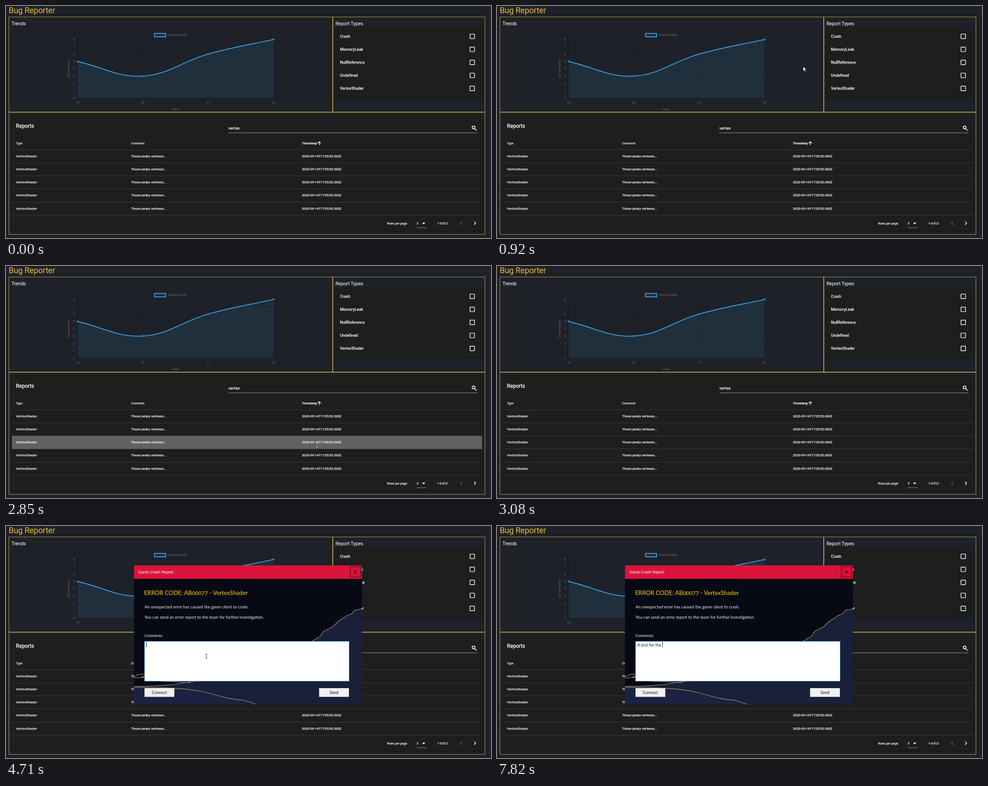
An HTML page that plays this animation: 1082x518 px, repeating every 8000 ms.

```html
<!DOCTYPE html>
<html lang="en">
<head>
<meta charset="utf-8">
<title>Bug Reporter</title>
<style>
html, body { margin: 0; width: 100%; height: 100%; overflow: hidden; background: #1e2128; }
svg { display: block; }
text { white-space: pre; }
.ui { font-family: Roboto, sans-serif; fill: #fff; }
.chart { font-family: "Liberation Sans", Arial, sans-serif; }
.form { font-family: Lato, sans-serif; font-variant-numeric: oldstyle-nums; }
</style>
</head>
<body>
<svg id="stage" width="1082" height="518" viewBox="0 0 1082 518"></svg>
<script>
const stage = document.getElementById('stage');
const BLUE = '#36a2eb', GOLD = '#e3b93f';

// Text is placed by the vertical middle of its capitals.
const text = (x, mid, str, size, cls, extra = '') =>
  `<text x="${x}" y="${mid + size * 0.36}" font-size="${size}" class="${cls}" ${extra}>${str}</text>`;
const ui = (x, mid, str, size, gap = 0, extra = '') =>
  text(x, mid, str, size, 'ui', `letter-spacing="${gap}" ${extra}`);
const rect = (x, y, w, h, fill, extra = '') =>
  `<rect x="${x}" y="${y}" width="${w}" height="${h}" fill="${fill}" ${extra}/>`;
const path = (d, stroke, width = 1, fill = 'none', extra = '') =>
  `<path d="${d}" stroke="${stroke}" stroke-width="${width}" fill="${fill}" ${extra}/>`;
const list = (n, fn) => Array.from({ length: n }, (_, i) => fn(i)).join('');
const MEDIUM = 'font-weight="500"';

const ROW_TOP = 321, ROW_H = 29.15;
const rowY = i => Math.round(ROW_TOP + i * ROW_H);

function panels() {
  const frame = (x, y, w, h) => rect(x, y, w, h, 'none', 'stroke="#f0c242" stroke-width=".75"');
  const shade = 'style="filter:drop-shadow(0 1px 1px #0006)"';
  return ui(6, 9, 'Bug Reporter', 18.5, -0.35, `style="fill:${GOLD}"`) +
    frame(6.5, 24.6, 722.1, 212.1) + frame(729.4, 24.6, 339.1, 212.1) + frame(6.5, 237.4, 1062, 272.6) +
    ui(12, 38.5, 'Trends', 11.2, -0.35) + ui(735, 38.5, 'Report Types', 11.2, -0.3) +
    rect(735, 48, 327, 156, '#1e1e1e', shade) + rect(13, 244, 1049, 258, '#1e1e1e', shade);
}

function chart() {
  const x = [160, 305.5, 451, 597], tick = n => 205.3 - n * 16.35;
  const label = (px, py, str, extra = '') =>
    text(px, py, str, 7.2, 'chart', `fill="#666" ${extra}`);
  const curve = 'M160 124C218.2 136.9 248.2 159.7 305.5 156.4S392 124 451 107.4 538.6 87.7 597 74.6';
  return list(9, i => path(`M154 ${tick(i)}H597`, '#000', 0.6, 'none', 'opacity=".12"') +
      label(154, tick(i), i, 'text-anchor="end"')) +
    x.map((px, i) => path(`M${px} 74V210`, '#000', 0.6, 'none', `opacity="${i ? 0.12 : 0.3}"`) +
      label(px, 215.5, [13, 15, 17, 20][i], 'text-anchor="middle"')).join('') +
    path(curve + 'V205H160Z', 'none', 0, BLUE, 'fill-opacity=".1"') +
    path(curve, BLUE, 1.9) +
    x.map((px, i) => `<circle cx="${px}" cy="${tick([5, 3, 6, 8][i])}" r="1.9" fill="#255b80" stroke="${BLUE}" stroke-width=".8"/>`).join('') +
    rect(331.3, 61.2, 24.8, 7.8, '#21303e', `stroke="${BLUE}" stroke-width="1.8"`) +
    label(360, 64.5, 'VertexShader') +
    label(378, 230, 'Hour', 'text-anchor="middle"') +
    label(0, 0, 'Occurrences', 'text-anchor="middle" transform="translate(139 140) rotate(-90)"');
}

function types() {
  return ['Crash', 'MemoryLeak', 'NullReference', 'Undefined', 'VertexShader'].map((name, i) => {
    const y = 67.7 + i * 29.1;
    return ui(745, y, name, 9.2, -0.22, MEDIUM) +
      rect(1035.1, y - 5.1, 10.2, 10.2, 'none', 'rx=".8" stroke="#fff" stroke-width="1.4"');
  }).join('');
}

function table() {
  const head = (x, str, gap, fill = '#ddd') =>
    ui(x, 306, str, 7, gap, `font-weight="700" style="fill:${fill}"`);
  return ui(22, 268, 'Reports', 12, -0.25, MEDIUM) +
    ui(496, 272.5, 'vertex', 9.5, -0.15, MEDIUM) +
    path('M496 283.2H1052', '#bbb', 0.8) +
    path('M1046.4 271.3a3.2 3.2 0 1 1-6.4 0a3.2 3.2 0 1 1 6.4 0M1045.5 273.8L1050 278.2', '#fff', 1.6) +
    head(22, 'Type', -0.1) + head(279, 'Comment', -0.15) + head(660, 'Timestamp', -0.25, '#fff') +
    path('M699 310.5V303M695.3 306.5L699 302.8L702.7 306.5', '#fff', 1.3) +
    list(6, i => path(`M13 ${rowY(i) + 0.2}H1062`, '#3a3a3a')) +
    rect(13, 0, 1049, 29.4, '#616161', 'id="hover"') +
    list(5, i => {
      const y = rowY(i) + 14.3;
      return ui(22, y, 'VertexShader', 8, -0.12, MEDIUM) +
        ui(279, y, 'Those pesky vertexes...', 8, -0.26, MEDIUM) +
        ui(660, y, '2020-09-14T17:05:52.000Z', 8, -0.45, MEDIUM);
    }) +
    ui(850, 485, 'Rows per page:', 7, -0.15, MEDIUM) + ui(916, 485, '5', 7.2, 0, MEDIUM) +
    ui(962, 485, '1-5 of 21', 7, -0.42, MEDIUM) +
    path('M916 495H938.5', '#aaa', 0.8) +
    path('M928 483.8H935.6L931.8 487.6Z', 'none', 0, '#fff') +
    path('M1017.7 481.5L1014.2 485L1017.7 488.5', '#6c6c6c', 1.3) +
    path('M1044.3 481.5L1047.8 485L1044.3 488.5', '#fff', 1.5);
}

function dialog() {
  const form = (x, y, str, size, fill, extra = '') =>
    text(x, y, str, size, 'form', `fill="${fill}" ${extra}`);
  const button = (x, str) => rect(x, 362, 66.5, 19.5, '#f0f0f0') +
    form(x + 33.2, 371.7, str, 9.1, '#111', 'text-anchor="middle"');
  const ridge = 'M794 184Q785 188 780 187C775 190 774 193 770 197Q760 199 755 204L741 213 730 224Q720 230 709 235C704 240 705 246 696 249L682 258';
  const hill = 'M285 358Q340 359 385 352T433 347';
  const shore = 'M285 360C350 361 395 362 430 368S490 387 530 389Q546 393 560 399';
  const foot = 'M285 337C293 335 296 329 309 331M285 338.5Q297 341 309 335M302 339L309 337M345 347Q375 347 412 350';
  const tan = '#a8996b';
  return rect(285.5, 88, 508.5, 310.5, '#070915') +
    '<clipPath id="inside"><rect x="285.5" y="118" width="508.5" height="280.5"/></clipPath><g clip-path="url(#inside)">' +
    path(ridge + 'L433 347Q412 349 385 352T285 358V399H794Z', 'none', 0, '#192039') +
    path(shore + 'H285Z', 'none', 0, '#1c2340') +
    [ridge, hill, shore, foot].map(d => path(d, tan, 1.1)).join('') + '</g>' +
    rect(285.5, 88, 508.5, 30, '#dc143c') +
    text(295, 102.7, 'Game Crash Report', 8.7, 'chart', 'fill="#fff"') +
    rect(768, 90.5, 23.5, 23.5, '#d21239', 'stroke="#3c0612"') +
    text(779.7, 102.3, 'X', 9.5, 'chart', 'fill="#160307" font-weight="700" text-anchor="middle"') +
    form(308, 149.5, 'ERROR CODE: AB00077 - VertexShader', 13.2, '#ffd000') +
    form(309, 180.5, 'An unexpected error has caused the game client to crash.', 9.27, '#f2f2f2') +
    form(309, 203.5, 'You can send an error report to the team for further investigation.', 9.27, '#f2f2f2') +
    text(308.5, 245.5, 'Comments:', 8.2, 'chart', 'fill="#f2f2f2"') +
    rect(309, 257.5, 456.5, 89, '#fff', 'id="field"') +
    form(313, 265.3, '', 9.27, '#222', 'id="typed"') +
    rect(313, 259, 1, 12, '#111', 'id="caret"') +
    button(309, 'Connect') + button(698.5, 'Send');
}

const tooltip = `<g id="tip">
  <circle cx="597" cy="74.5" r="2.6" fill="#255b80" stroke="${BLUE}"/>
  ${rect(534, 79, 68, 25, '#000', 'rx="3.5" opacity=".85"')}
  ${path('M593.5 79L597 76L600.5 79Z', 'none', 0, '#000', 'opacity=".85"')}
  ${text(537.5, 85.5, '20', 7.2, 'chart', 'fill="#fff" font-weight="700"')}
  ${rect(537.5, 93.5, 7, 7, '#e3f1fb', 'stroke="#fff"')}
  ${text(546, 96.7, 'VertexShader: 8', 7, 'chart', 'fill="#fff" font-weight="700"')}</g>`;

stage.innerHTML = panels() + chart() + types() + table() + tooltip +
  `<g id="dialog">${dialog()}</g>` +
  path('M0 0V10.2L2.4 8L4 11.8L5.7 11L4.1 7.4H7.2Z', '#111', 0.7, '#fff', 'id="arrow"') +
  path('M-2.3 -4.6H-.6L0 -4L.6 -4.6H2.3M0 -4V4M-2.3 4.6H-.6L0 4L.6 4.6H2.3', '#333', 1, 'none', 'id="beam"');

const el = {};
for (const id of ['hover', 'tip', 'dialog', 'field', 'typed', 'caret', 'arrow', 'beam'])
  el[id] = document.getElementById(id);
const show = (node, on) => node.setAttribute('display', on ? 'inline' : 'none');

// Pointer trips: [time, x, y] stops, then the time at which the pointer vanishes.
const trips = [
  { stops: [[300, 1064, 501], [450, 928, 357], [600, 830, 255], [825, 705, 150], [1080, 630, 99]], end: 1140 },
  { stops: [[1140, 618, 89], [1290, 600, 77], [1680, 597, 75]], end: 2620 },
  { stops: [[2620, 602, 88], [2695, 616, 150], [2770, 650, 262], [2845, 694, 400], [2920, 715, 462], [2995, 724, 489]], end: 3080 },
  { stops: [[4010, 486, 369], [4160, 462, 325], [4470, 448, 290], [4620, 448, 290], [4710, 447, 291]], end: 5260 }
];
const STEP = 75;

function pointer(time) {
  const trip = trips.find(p => time >= p.stops[0][0] && time < p.end);
  if (!trip) return null;
  const start = trip.stops[0][0];
  const t = start + Math.floor((time - start) / STEP) * STEP;
  const next = trip.stops.findIndex(s => s[0] > t);
  if (next < 0) return trip.stops[trip.stops.length - 1].slice(1);
  const a = trip.stops[next - 1], b = trip.stops[next], k = (t - a[0]) / (b[0] - a[0]);
  return [a[1] + (b[1] - a[1]) * k, a[2] + (b[2] - a[2]) * k];
}

const message = 'A test for the ';
const keys = [5260, 5570, 5720, 5870, 6100, 6270, 6420, 6590, 6970, 7120, 7290, 7440, 7520, 7670, 7820];
const easeOut = k => 1 - (1 - Math.min(1, Math.max(0, k))) ** 4;

function draw(t) {
  const open = t >= 3690, focused = t >= 4470;
  const p = pointer(t);
  const row = p && !open ? Math.floor((p[1] - ROW_TOP) / ROW_H) : -1;
  const onRow = row >= 0 && row < 5;
  show(el.hover, onRow);
  if (onRow) el.hover.setAttribute('y', rowY(row) + 0.2);

  el.tip.setAttribute('opacity', easeOut((t - 1280) / 400) - easeOut((t - 2620) / 400));

  show(el.dialog, open);
  el.field.setAttribute('stroke', focused ? '#3489da' : '#7a7a7a');
  el.typed.textContent = message.slice(0, keys.filter(k => k <= t).length);
  show(el.caret, focused && !(t >= 5020 && t < 5260));
  if (open) {
    const width = el.typed.textContent ? el.typed.getComputedTextLength() : 0;
    el.caret.setAttribute('x', Math.round(313 + width));
  }

  const overText = onRow && p[0] > 660 && p[0] < 746 && Math.abs(p[1] - rowY(row) - 14) < 9;
  const beam = p && (overText || (open && p[1] < 347));
  show(el.beam, beam);
  show(el.arrow, p && !beam);
  if (p) {
    const node = beam ? el.beam : el.arrow;
    node.setAttribute('transform', `translate(${Math.round(p[0])} ${Math.round(p[1])})`);
    el.beam.setAttribute('stroke', open ? '#333' : '#aaa');
  }
}

const began = performance.now();
function tick() {
  draw((performance.now() - began) % 8000);
  requestAnimationFrame(tick);
}
tick();
</script>
</body>
</html>
```
